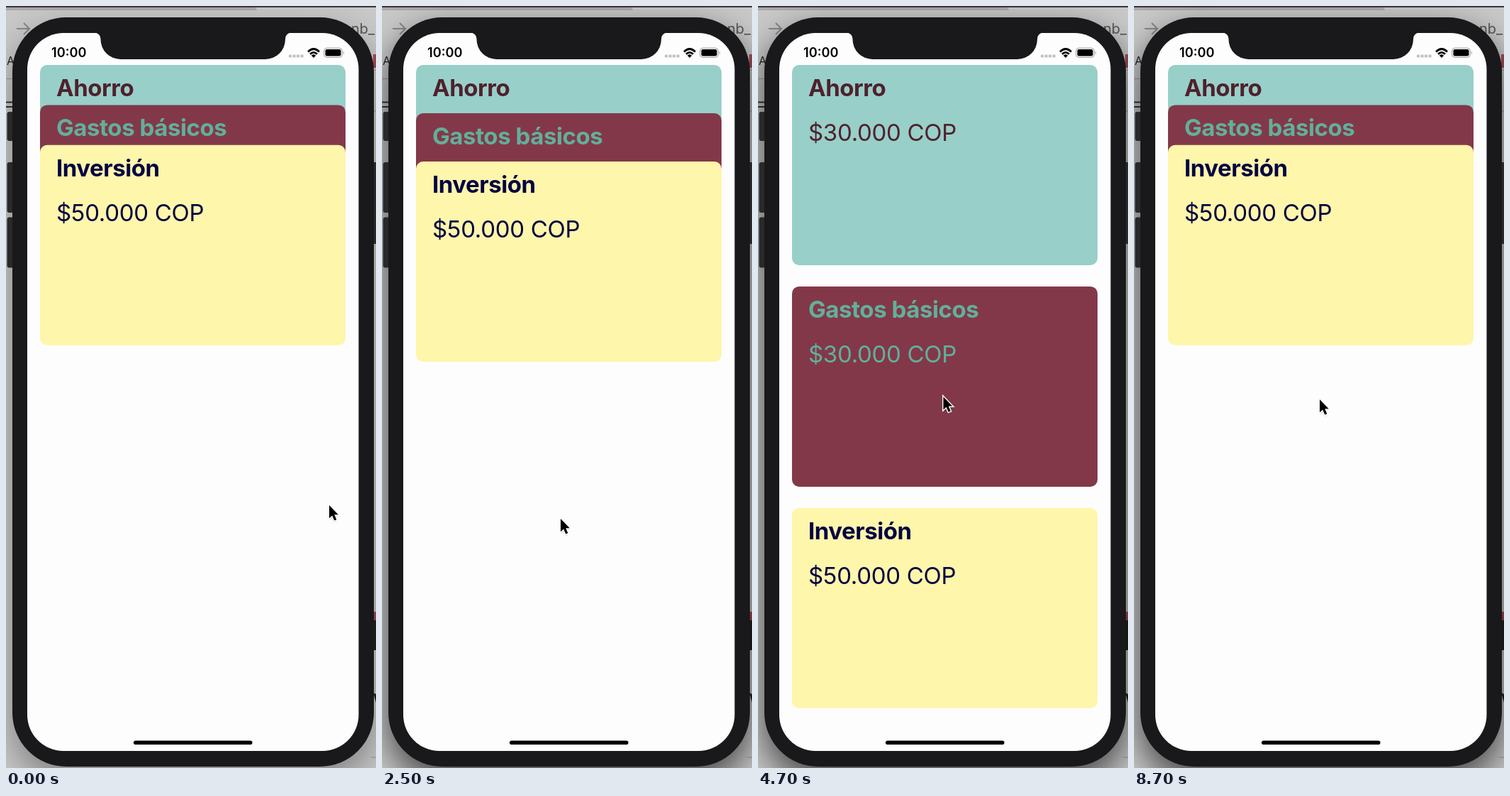
Animation of 522x1073 px, one loop 8900 ms. Source, as an HTML page:

```html
<!DOCTYPE html>
<html lang="es">
<head>
<meta charset="utf-8">
<style>
html, body { margin: 0; width: 100%; height: 100%; overflow: hidden; background: #b4b4b4; }
svg { display: block; width: 522px; height: 1073px; font-family: Inter, Roboto, sans-serif; }
.title { font-size: 33px; font-weight: 700; letter-spacing: -.45px; }
.price { font-size: 33px; letter-spacing: -.3px; }
</style>
</head>
<body>
<svg viewBox="0 0 522 1073">
  <defs>
    <filter id="blur" x="-30%" y="-20%" width="160%" height="140%"><feGaussianBlur stdDeviation="24"/></filter>
    <filter id="soft" x="-50%" y="-50%" width="200%" height="200%"><feGaussianBlur stdDeviation="1.2"/></filter>
    <clipPath id="screen"><rect x="30" y="38" width="467.5" height="1011" rx="51"/></clipPath>
  </defs>

  <rect width="522" height="1073" fill="#c8c8c8"/>
  <path d="M0 0H340Q354 1 354 6H0Z" fill="#aaa8aa"/>
  <path d="M0 1H522" stroke="#3b393b" stroke-width="2"/>
  <path d="M15 32H33M25 24l8 8-8 8" fill="none" stroke="#888" stroke-width="2"/>
  <path d="M0 102.500H9M510 90H522M510 148H522M515 1058H522" stroke="#999"/>
  <path d="M0 135.500H9M0 142H9" stroke="#333" stroke-width="2"/>
  <text x="1" y="83" font-size="16" fill="#222">A</text>
  <text x="487" y="39" font-size="20" fill="#555">nb_</text>
  <path d="M518 68h4v19h-4zM518 853h4v12h-4z" fill="#a34d55"/>
  <path d="M518 865h4v42h-4zM518 967l4 2v12z" fill="#222"/>
  <rect id="shadow" x="9" y="36" width="510" height="1055" rx="76" filter="url(#blur)"/>

  <g fill="#29282a">
    <rect x="1.500" y="149" width="14" height="41" rx="3"/>
    <rect x="1.500" y="220" width="14" height="71" rx="3"/>
    <rect x="1.500" y="297.500" width="14" height="71" rx="3"/>
    <rect x="510" y="220" width="13" height="115"/>
  </g>
  <rect x="9" y="16" width="510" height="1055" rx="76" fill="#19181a"/>
  <g clip-path="url(#screen)">
    <rect x="30" y="38" width="468" height="1011" fill="#fefdfe"/>
    <g id="cards"></g>
  </g>
  <path d="M124 37.500Q133.500 38 133.500 47A28 28 0 0 0 161.500 75H366A28 28 0 0 0 394 47Q394 38 403 37.500Z" fill="#19181a"/>

  <text x="64" y="72" font-size="18.200" font-weight="600">10:00</text>
  <g fill="#c3c2c5">
    <circle cx="401" cy="70.500" r="2.300"/><circle cx="406.500" cy="70.500" r="2.300"/>
    <circle cx="412" cy="70.500" r="2.300"/><circle cx="417.500" cy="70.500" r="2.300"/>
  </g>
  <path d="M426 64.500Q434 56.500 442 64.500M429 67.800Q434 63 439 67.800" fill="none" stroke="#000" stroke-width="2.600"/>
  <path d="M430.800 69.700Q434 67 437.200 69.700L434 73Z"/>
  <rect x="448.700" y="59.200" width="25.600" height="13.200" rx="4" fill="none" stroke="#9b9a9c"/>
  <rect x="450.500" y="61" width="22" height="9.600" rx="2.300"/>
  <path d="M475.800 63.500q2 2.300 0 4.600z" fill="#9b9a9c"/>
  <rect x="180" y="1034.500" width="167.500" height="5.600" rx="2.800"/>

  <g id="cursor">
    <path d="M0 2V20L4 16.500L7 23L10 22L7 15H12.500Z" filter="url(#soft)" opacity=".4"/>
    <path d="M0 0V18.300L4.200 14.500L7.200 21.500L10.300 20.200L7.300 13.300H12.800Z" stroke="#fff" stroke-width="2.800" paint-order="stroke"/>
  </g>
</svg>
<script>
const $ = id => document.getElementById(id);
const LOOP = 8900, STEP = 100;
const TOP = 83, HEIGHT = 282, PEEK = 56.4, VIEW = 1011;

const cards = [
  ['Ahorro', '$30.000 COP', '#98cfc9', '#4f212c'],
  ['Gastos básicos', '$30.000 COP', '#833849', '#61b09b'],
  ['Inversión', '$50.000 COP', '#fef6ab', '#050342'],
];
$('cards').innerHTML = cards.map(([title, price, fill, ink]) => `<g>
  <rect x="48" width="431" height="${HEIGHT}" rx="10" fill="${fill}"/>
  <g fill="${ink}"><text class="title" x="71" y="44">${title}</text>
  <text class="price" x="71" y="107">${price}</text></g></g>`).join('');

const clamp = v => Math.max(0, Math.min(1, v));
const mix = (a, b, p) => a + (b - a) * p;
const smooth = p => p * p * (3 - 2 * p);
const easeOut = n => p => 1 - (1 - p) ** n;

// Pointer moves: start, end, target x, target y, easing
const moves = [
  [50, 650, 210, 356, smooth],
  [700, 1950, 252, 722, easeOut(1.9)],
  [2720, 3300, 219, 250, smooth],
  [3400, 4900, 262, 554, easeOut(2.18)],
];
// Pulls on the list: start, release, pointer y at the start
const drags = [[700, 2036, 356], [3400, 4943, 250]];

function pointer(t) {
  let x = 456, y = 703;
  for (const [start, end, tx, ty, ease] of moves) {
    const p = ease(clamp((t - start) / (end - start)));
    x = mix(x, tx, p);
    y = mix(y, ty, p);
  }
  return [x, y];
}

const rubber = d => VIEW * (1 - 1 / (d * 0.55 / VIEW + 1));

// Overscroll: rubber band while held, critically damped spring afterwards
function pull(t) {
  const drag = drags.findLast(d => t >= d[0]);
  if (!drag) return 0;
  const [, release, y0] = drag;
  const held = rubber(pointer(Math.min(t, release))[1] - y0);
  const u = Math.max(0, t - release) * 0.0109;
  return held * (1 + u) * Math.exp(-u);
}

function draw(t) {
  const gap = PEEK + pull(t) * (2 * HEIGHT - PEEK) / HEIGHT;
  [...$('cards').children].forEach((card, i) =>
    card.setAttribute('transform', `translate(0 ${TOP + i * gap})`));
  $('cursor').setAttribute('transform', `translate(${pointer(t)})`);
  $('shadow').setAttribute('opacity', t < 700 ? 0.35 : 0.65);
}

const begin = performance.now();
function tick() {
  const t = (performance.now() - begin) % LOOP;
  draw(Math.floor(t / STEP) * STEP);
  requestAnimationFrame(tick);
}
tick();
</script>
</body>
</html>
```
